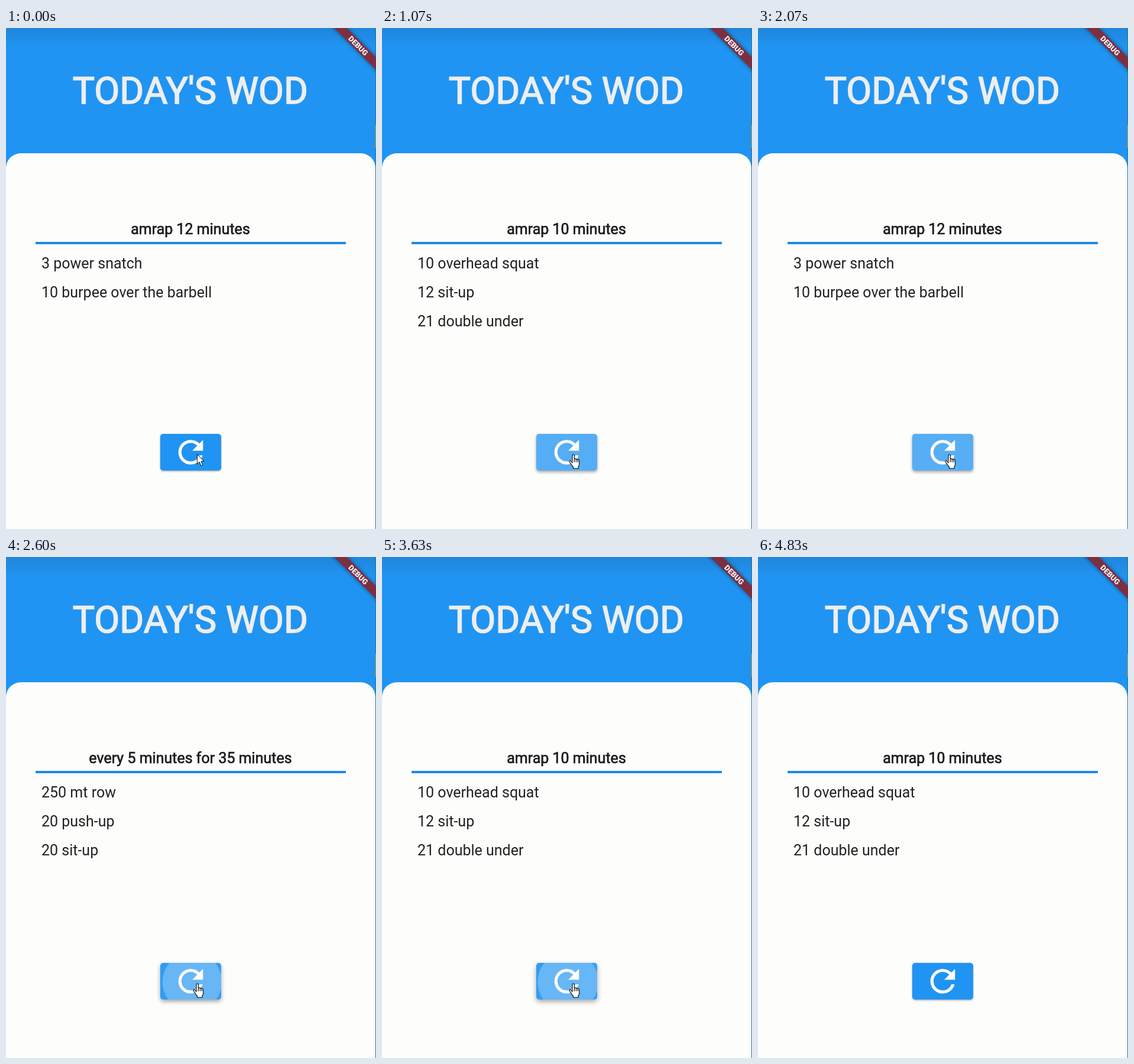
Recreate the animation shown at these times as an HTML page. Size 626x848 px, loop 4.86 s.

```html
<!DOCTYPE html>
<html lang="en">
<head>
<meta charset="utf-8">
<title>Workout of the day</title>
<style>
  html, body { margin: 0; width: 100%; height: 100%; overflow: hidden; background: #2094f2; }
  svg { display: block; width: 626px; height: 848px; font-family: Roboto, sans-serif; }
</style>
</head>
<body>
<svg viewBox="0 0 626 848">
  <defs>
    <linearGradient id="topShade" x1="0" y1="0" x2="0" y2="1">
      <stop offset="0" stop-color="#2085da"/>
      <stop offset="1" stop-color="#2094f2"/>
    </linearGradient>
    <clipPath id="buttonClip"><rect x="261" y="687" width="103" height="62" rx="5"/></clipPath>
    <filter id="soft" x="-50%" y="-50%" width="200%" height="200%"><feGaussianBlur id="blur" stdDeviation="2"/></filter>
    <filter id="ribbonSoft" x="-20%" y="-100%" width="140%" height="300%"><feGaussianBlur stdDeviation="3.5"/></filter>
  </defs>

  <rect width="626" height="848" fill="#2094f2"/>
  <rect width="626" height="32" fill="url(#topShade)"/>
  <text x="312" y="127.5" font-size="62.5" fill="#eee" stroke="#eee" stroke-width="1.6" text-anchor="middle">TODAY'S WOD</text>
  <path d="M0 848V237a25 25 0 0 1 25-25H600a25 25 0 0 1 25 25V848z" fill="#fdfdfc"/>
  <path d="M625.5 0V848" stroke="#2b7590"/>
  <path d="M625.5 164V203" stroke="#c99a1c"/>

  <g transform="translate(626 0) rotate(45)">
    <rect x="-60" y="35" width="120" height="15" fill="#000" opacity=".45" filter="url(#ribbonSoft)"/>
    <rect x="-60" y="35" width="120" height="15" fill="#7c2f41"/>
    <text y="47" font-size="12.75" font-weight="900" fill="#f6f4f4" text-anchor="middle">DEBUG</text>
  </g>

  <text id="heading" x="312" y="349" font-size="25" fill="#1c1c1c" stroke="#1c1c1c" stroke-width=".7" text-anchor="middle"></text>
  <rect x="50" y="362" width="525" height="4" fill="#1e88e5"/>
  <g id="items" font-size="25" fill="#212121"></g>

  <rect id="shadow" x="261" y="687" width="103" height="62" rx="5" opacity=".36" filter="url(#soft)"/>
  <g clip-path="url(#buttonClip)" fill="#fff">
    <rect x="261" y="687" width="103" height="62" fill="#2094f2"/>
    <rect id="hover" x="261" y="687" width="103" height="62"/>
    <g id="ripples"></g>
  </g>
  <path transform="translate(281.25 686.75) scale(2.604)" fill="#fdfdfc"
    d="M17.65 6.35A7.96 7.96 0 0 0 12 4c-4.42 0-7.99 3.58-7.99 8s3.57 8 7.99 8c3.73 0 6.84-2.55 7.73-6h-2.08c-.82 2.33-3.04 4-5.65 4-3.31 0-6-2.69-6-6s2.69-6 6-6c1.66 0 3.14.69 4.22 1.78L13 11h7V4z"/>

  <path id="arrow" transform="translate(323 721)" fill="#fff" stroke="#111" stroke-linejoin="round"
    d="M.5.5V17L4.3 13.4 7 20 9.8 18.8 7.1 12.4H12z"/>
  <path id="hand" transform="translate(316 721)" fill="#fff" stroke="#111" stroke-width="1.2" stroke-linejoin="round"
    d="M6 15V3Q6 1 7.7 1T9.4 3V9Q9.5 7.8 11 7.9T12.4 9.4Q12.8 8.4 14 8.7T15.2 10.2Q15.7 9.5 16.8 9.9T17.7 11.5V17Q17.7 20 16 22V24.5H7.5V22Q5 19.5 3.3 16.3L1.2 13.3Q.5 11.8 1.8 11.3T4 12.3z M9.4 9V14M12.4 9.5V14M15.2 10.5V14"/>
</svg>
<script>
const LOOP = 4860, ENTER = 30, LEAVE = 3920;
const $ = id => document.getElementById(id);
const lerp = (a, b, p) => a + (b - a) * p;
const clamp = v => Math.max(0, Math.min(1, v));
const set = (id, attrs) => {
  for (const name in attrs) $(id).setAttribute(name, attrs[name]);
};

const amrap12 = ['amrap 12 minutes', '3 power snatch', '10 burpee over the barbell'];
const emom30 = ['emom 30 minutes', 'min 1: 5 deadlift', 'min 2: 8 hang power snatch',
  'min 3: 30 double under', 'min 4: 15 kettlebell swing', 'min 5: rest'];
const every5 = ['every 5 minutes for 35 minutes', '250 mt row', '20 push-up', '20 sit-up'];
const amrap10 = ['amrap 10 minutes', '10 overhead squat', '12 sit-up', '21 double under'];

const clicks = [
  { down: 340, up: 430, workout: emom30 },
  { down: 540, up: 795, workout: amrap10 },
  { down: 1370, up: 1455, workout: emom30 },
  { down: 1540, up: 1800, workout: amrap12 },
  { down: 2350, up: 2520, workout: every5 },
  { down: 3300, up: 3560, workout: amrap10 }
];
const elevations = [[ENTER, 4], ...clicks.flatMap(c => [[c.down, 8], [c.up, 4]]), [LEAVE, 2]];

function bezier(x1, y1, x2, y2) {
  const at = (a, b, s) => 3 * a * s * (1 - s) ** 2 + 3 * b * s * s * (1 - s) + s ** 3;
  return x => {
    let lo = 0, hi = 1;
    for (let i = 0; i < 20; i++) {
      const mid = (lo + hi) / 2;
      if (at(x1, x2, mid) < x) lo = mid; else hi = mid;
    }
    return at(y1, y2, lo);
  };
}
const ease = bezier(.25, .1, .25, 1);
const fastOutSlowIn = bezier(.4, 0, .2, 1);

// Each change of elevation starts from wherever the previous one had got to.
function elevationAt(t, i = elevations.length - 1) {
  if (i < 0) return 2;
  const [start, value] = elevations[i];
  if (t < start) return elevationAt(t, i - 1);
  return lerp(elevationAt(start, i - 1), value, fastOutSlowIn(clamp((t - start) / 200)));
}

// A held ripple grows slowly; on release it finishes quickly and then fades.
function ripple({ down, up }, t) {
  const held = clamp((Math.min(t, up) - down) / 1000);
  const released = Math.max(0, t - up);
  const p = ease(lerp(held, 1, clamp(released / 225)));
  const alpha = clamp((t - down) / 75) * (1 - clamp((released - 225) / 150));
  return `<circle cx="${lerp(324, 312.5, p)}" cy="${lerp(723, 718, p)}"
    r="${lerp(18, 60, p)}" opacity="${.26 * alpha}"/>`;
}

let shown;
function showWorkout(workout) {
  if (workout === shown) return;
  shown = workout;
  const [heading, ...items] = workout;
  $('heading').textContent = heading;
  $('items').innerHTML = items.map((item, i) =>
    `<text x="60" y="${Math.round(407.25 + i * 48.75)}">${item}</text>`).join('');
}

function draw(t) {
  const last = clicks.filter(c => t >= c.up).pop();
  showWorkout(last ? last.workout : amrap12);

  const e = elevationAt(t);
  set('shadow', { transform: `translate(0 ${e * .6})` });
  set('blur', { stdDeviation: .5 + e * .6 });
  set('hover', { opacity: .08 * (clamp((t - ENTER) / 50) - clamp((t - LEAVE) / 50)) });
  $('ripples').innerHTML = clicks.filter(c => t >= c.down && t < c.up + 375)
    .map(c => ripple(c, t)).join('');

  set('arrow', { visibility: t < ENTER ? 'visible' : 'hidden' });
  set('hand', { visibility: t >= ENTER && t < LEAVE ? 'visible' : 'hidden' });
}

const begin = performance.now();
function tick() {
  draw((performance.now() - begin) % LOOP);
  requestAnimationFrame(tick);
}
tick();
</script>
</body>
</html>
```
